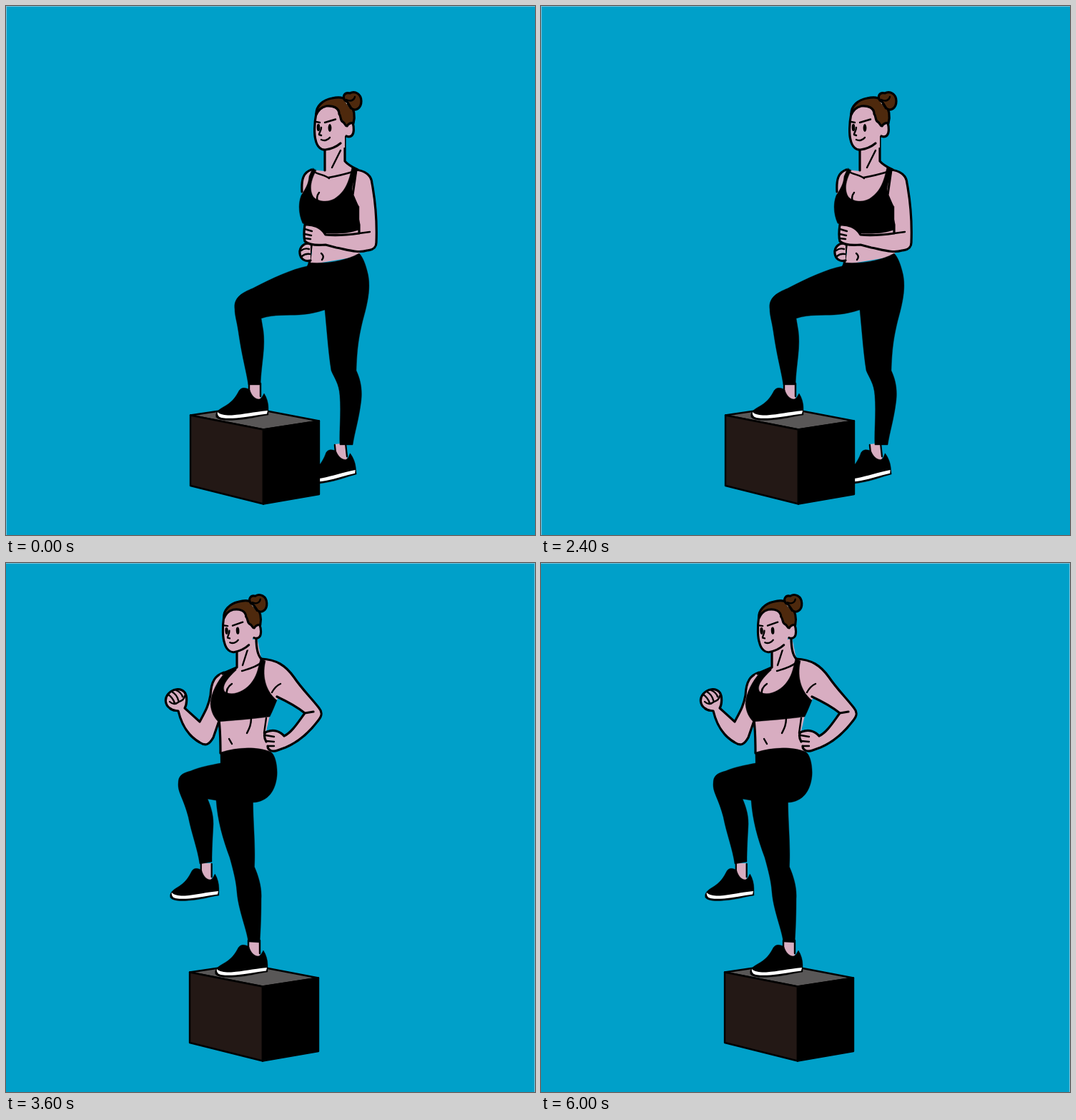
These frames come from a looping animation (740 px wide and 740 px high, 7.2 s). An HTML page:

```html
<!DOCTYPE html>
<html lang="en">
<head>
<meta charset="utf-8">
<title>Step-ups</title>
<style>
  html, body { margin: 0; width: 100%; height: 100%; overflow: hidden; background: #00a0c9; }
  svg { display: block; width: 100%; height: 100%; }
  path { stroke: #000; stroke-width: 3.2; stroke-linecap: round; stroke-linejoin: round; fill: none; }
  .skin { fill: #d8adc1; }
  .hair { fill: #4e290d; }
  .ink { fill: #000; stroke-width: .4; }
  .thin { stroke-width: 2.4; }
  .flat { stroke: none; }
  .white { fill: #fff; stroke: none; }
  .box path { stroke-width: 2.4; }
  .top { fill: #595757; }
  .front { fill: #231815; }
  .side { fill: #000; }
  .edge { stroke: #7cc4dc; stroke-width: 1; }
</style>
</head>
<body>
<svg viewBox="0 0 740 740">
  <defs>
    <g id="box" class="box">
      <path class="top" d="M258 572.500L336 561L438 580.500L360 592.500Z"/>
      <path class="front" d="M258 572.500L360 592.500V696.500L258 671Z"/>
      <path class="side" d="M360 592.500L438 580.500V683L360 696.500Z"/>
    </g>

    <g id="shoe">
      <path class="skin flat" d="M340 527H356V552H340Z"/>
      <path class="thin" d="M340 528V540M356 528V546"/>
      <path class="ink" d="M294 575C292 569 297 565 304 561C315 555 320 549 325 540C328 533 335 533 341 537C343 544 348 550 354 550C358 549 359 545 361 542C365 548 367 556 367 562V572C352 574 340 578 322 579C310 580 298 580 294 575Z"/>
      <path class="white" d="M296 568C300 572 309 573 316 572.500C334 571 345 568 366 566L365 570.500C350 572 337 575.500 322 576.500C311 577 301 577 298 574.500Q295 571 296 568Z"/>
    </g>

    <g id="head">
      <path class="skin flat" d="M434 150C431 165 431 180 433 187C435 197 441 201 446 201L474 198V182L480 183L487 170L478 135L450 135Z"/>
      <path d="M434 150C431 165 431 180 433 187C435 197 441 202 447 201C455 200 462 197 468 192"/>
      <path class="skin" d="M485 163C487 170 487 178 484 181C481 184 478 183 476 182"/>
      <path class="hair" d="M434 152C433 140 444 131 456 129C465 127 472 128 475 131L482 138C488 146 488 156 486 164C482 163 479 165 477 168C474 168 475 164 471 162C467 160 469 154 466 151C466 142 457 139 448 140C440 142 437 146 434 152Z"/>
      <path class="white" d="M473 132L481 143L484 141L477 131Z"/>
      <path class="hair" d="M474 132C470 126 474 120 481 122C488 118 497 123 497 133C497 143 489 148 483 143L478 135Z"/>
      <path class="thin" d="M476 131C482 134 487 132 488 127M478 137L482 143"/>
      <ellipse cx="453" cy="170.500" rx="2.400" ry="5.400"/>
      <ellipse cx="437" cy="170" rx="2.300" ry="5.200"/>
      <path class="thin" d="M446 163L461 158.500M434 162L439 163M441 170C441 175 437 179 438 180L441 181M441 187C445 189 450 188 453 184"/>
    </g>
  </defs>

  <rect width="740" height="740" fill="#00a0c9"/>

  <g id="low">
    <path class="edge" d="M0 .5H740M.5 0V740"/>
    <use href="#shoe" transform="translate(490 653) rotate(-6) scale(.96 1) translate(-367 -570)"/>
    <use href="#box"/>
    <use href="#shoe"/>
    <!-- torso and neck -->
    <path class="skin flat" d="M446 198V231L428 229C417 232 413 240 413 258L428 320V345L424 362L495 350L492 300L500 232L474 219V190Z"/>
    <path d="M446 199V230M474 183V217C479 223 486 226 492 229M427 229C416 233 413 242 414 260M428 330C426 340 426 350 424 362"/>
    <path class="thin" d="M468 202L456 226M433 233C439 236 447 237 452 241M451 240C463 238 475 235 488 231"/>
    <!-- far fist -->
    <path class="skin" d="M426 333C418 330 410 337 411 346C412 354 418 358 426 356"/>
    <path class="thin" d="M413 342Q418 338 424 340M414 350Q419 346 425 347"/>
    <path class="thin" d="M441 346Q446 350 442 355"/>
    <!-- near arm -->
    <path class="skin" d="M490 229C504 231 511 237 512 248C517 275 519 305 518 331C518 338 514 341 505 342C492 346 478 341 462 338L447 334C437 335 425 335 418 329C416 321 417 313 418 306C429 305 441 309 447 320C464 322 480 320 494 318V306L485 264Z"/>
    <path class="thin" d="M494 318L509 316M418 312L428 315M418 319L427 321M418 325L426 326"/>
    <path class="ink" d="M429 227L424 238C423 250 419 255 413 265C408 278 410 293 415 304L420 306C434 305 441 310 447 318C464 319 480 318 494 313V280C488 276 484 268 484 256C485 246 490 238 491 229L484 225C480 245 475 258 463 267C454 275 438 275 430 267C424 258 426 244 434 230Z"/>
    <path class="skin flat" d="M486 264C489 268 492 274 494 281V262Z"/>
    <path class="thin" d="M438 261C434 266 435 270 436 274M485 264L492 280"/>
    <path class="ink" d="M421 364C400 368 372 381 345 395C330 401 318 408 320 424C320 433 323 441 325 455C330 490 336 510 339 530H356C357 500 363 480 360 455L357 437C375 431 395 433 410 432C425 431 437 428 446 425C449 455 451 485 455 510C459 520 466 528 467 545C469 570 466 595 467 614H485C488 595 493 580 496 558C499 540 497 525 490 510C491 480 493 465 499 440C507 412 511 390 505 370C502 358 498 350 494 346C475 357 445 361 424 359Z"/>
    <use href="#head"/>
  </g>

  <g id="high">
    <path class="edge" d="M0 .5H740M739.500 0V740"/>
    <use href="#box" x="-1"/>
    <use href="#shoe" x="-1"/>
    <use href="#shoe" transform="translate(230 463) scale(.93 1) translate(-294 -570)"/>
    <!-- far arm -->
    <path class="skin" d="M305 153C293 157 287 165 286 185C283 202 277 210 271 222L250 203C253 198 254 187 250 181C244 174 233 176 227 183C221 190 223 199 229 203C233 207 237 206 241 207C246 228 257 243 271 251C280 257 285 253 290 244L299 218Z"/>
    <path class="thin" d="M227 184Q233 188 236 196M232 180Q239 184 241 192M238 178Q245 181 247 187M229 194Q235 200 242 194Q249 192 250 186"/>
    <!-- torso and neck -->
    <path class="skin flat" d="M323 120V146L300 156L288 180L298 220L300 268L370 266L364 235L372 200L400 165L357 134L351 104Z"/>
    <path d="M323 122V146C315 150 309 151 303 155M350 104C350 117 351 128 357 134M298 220C300 236 300 250 300 266"/>
    <path class="thin" d="M339 118L331 143M330 151C340 148 349 146 356 140M343 216C343 227 340 232 337 238M312 246L316 253"/>
    <!-- near arm -->
    <path class="skin flat" d="M357 134C378 135 391 143 403 160L438 203C443 209 442 214 437 220C425 236 410 250 391 258L380 262C373 265 366 262 364 254L361 241C361 236 364 234 367 236C375 232 384 236 389 242C400 235 409 222 417 210C407 201 394 194 380 187L362 172Z"/>
    <path d="M357 134C378 135 391 143 403 160C413 175 428 190 438 203C443 209 442 214 437 220C425 236 410 250 391 258L380 262C373 265 366 262 366 256M364 250C361 245 360 237 365 236C375 232 384 236 389 242C400 237 409 222 418 210M379 187C394 194 407 201 418 210L430 208"/>
    <path class="thin" d="M363 241L375 243M364 249L375 250M366 256L375 256M364 217L361 238"/>
    <path class="ink" d="M322 147L306 154C296 165 287 181 286 197C287 209 291 216 297 222C320 220 347 218 369 215C373 207 376 199 379 192C366 182 357 162 363 137L356 134C353 145 352 155 345 165C335 180 316 187 306 180C301 172 310 161 322 150Z"/>
    <path class="thin" d="M316 169Q307 175 309 185M384 169Q377 172 372 181"/>
    <path class="ink" d="M300 265C325 257 352 257 370 264C377 268 380 285 379 298C377 318 367 334 345.500 335C346 370 349 395 347.500 425C354 440 358 455 357 470C357 495 356 515 355 531L339 530C336 510 325 485 323 460C322 445 318 430 313 412C303 385 296 360 294 332L282 330C286 340 290 350 290 365C289 385 288 400 288 418L271 421C268 400 260 380 255 355C248 328 240 321 241 308C241 298 246 294 258 291C272 285 285 283 300 280Z"/>
    <use href="#head" transform="translate(330.500 87) rotate(-3) scale(.97) translate(-460 -163)"/>
  </g>
</svg>
<script>
  const STEP = 1200;
  const poses = ["low", "high"].map(id => document.getElementById(id));

  function draw(ms) {
    const now = Math.floor(ms / STEP) % poses.length;
    poses.forEach((pose, i) => pose.setAttribute("display", i === now ? "inline" : "none"));
  }

  const start = performance.now();
  function tick() {
    draw(performance.now() - start);
    requestAnimationFrame(tick);
  }
  draw(0);
  requestAnimationFrame(tick);
</script>
</body>
</html>
```
